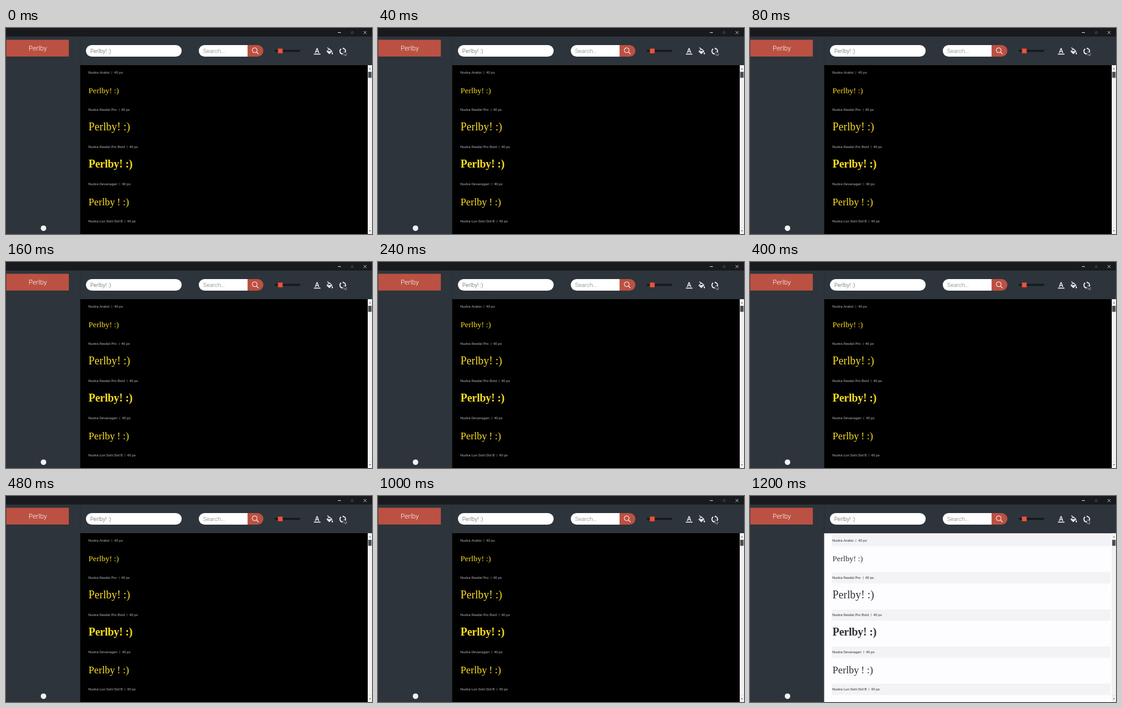
Write an HTML page with a canvas that moves like this. It is 600x338 px and loops after 1.92 s.

```html
<!DOCTYPE html>
<html lang="en">
<head>
<meta charset="utf-8">
<title>Font viewer</title>
<style>
  html, body { margin: 0; width: 100%; height: 100%; overflow: hidden; background: #2c333a; }
  canvas { display: block; width: 100%; height: 100%; }
</style>
</head>
<body>
<canvas id="stage"></canvas>
<script>
const W = 600, H = 338, LOOP = 1920;
const canvas = document.getElementById('stage');
const ctx = canvas.getContext('2d');
const dpr = window.devicePixelRatio || 1;
canvas.width = W * dpr;
canvas.height = H * dpr;

const SANS = 'Roboto, sans-serif';
const SERIF = '"Liberation Serif", serif';
const PANEL = '#2d343b', RED = '#bb5142', ICON = '#e3e5e7';
const SAMPLE = 'Perlby! :)';

const DARK = { back: '#000', label: '#b0b0b0', text: '#fbdd22', bar: null, edge: '#1d2226' };
const LIGHT = { back: '#fdfcfe', label: '#353537', text: '#303236', bar: '#f3f2f4', edge: '#8d9195' };

const fonts = [
  { name: 'Nudva Arabic', size: 13.1, base: 107 },
  { name: 'Nudva Resdal Pro', size: 17.9, base: 167.5 },
  { name: 'Nudva Resdal Pro Bold', size: 18.2, base: 228.5, weight: 'bold', spacing: -0.22 },
  { name: 'Nudva Devanagari', size: 16.6, base: 290.5, sample: 'Perlby\u2009! :)' },
  { name: 'Nudva Lun Soiti Std B' }
];

function rect(x, y, w, h, color) {
  ctx.fillStyle = color;
  ctx.fillRect(x, y, w, h);
}

function round(x, y, w, h, r, color) {
  ctx.fillStyle = color;
  ctx.beginPath();
  ctx.roundRect(x, y, w, h, r);
  ctx.fill();
}

function text(str, x, y, font, color, align = 'left', spacing = 0) {
  ctx.font = font;
  ctx.fillStyle = color;
  ctx.textAlign = align;
  ctx.letterSpacing = spacing + 'px';
  ctx.fillText(str, x, y);
}

function trace(points) {
  ctx.beginPath();
  points.forEach(([x, y], i) => i ? ctx.lineTo(x, y) : ctx.moveTo(x, y));
}

function fillPoly(points, color) {
  trace(points);
  ctx.closePath();
  ctx.fillStyle = color;
  ctx.fill();
}

function line(points, color, width) {
  trace(points);
  ctx.strokeStyle = color;
  ctx.lineWidth = width;
  ctx.stroke();
}

function arc(x, y, r, from, to, color, width) {
  ctx.beginPath();
  ctx.arc(x, y, r, from, to);
  ctx.strokeStyle = color;
  ctx.lineWidth = width;
  ctx.stroke();
}

function disc(x, y, r, color) {
  ctx.beginPath();
  ctx.arc(x, y, r, 0, Math.PI * 2);
  ctx.fillStyle = color;
  ctx.fill();
}

function windowBar() {
  rect(0, 0, W, 14, '#181a1d');
  line([[544, 7.5], [549, 7.5]], '#d4d5d6', 1);
  line([[567.5, 5.3], [569.3, 7.5], [567.5, 9.7], [565.7, 7.5], [567.5, 5.3]], '#6f7275', 0.7);
  line([[586.3, 5.2], [590.8, 9.7]], '#dcdcdd', 0.9);
  line([[590.8, 5.2], [586.3, 9.7]], '#dcdcdd', 0.9);
}

function sidebar() {
  rect(0, 14, 122, H - 14, PANEL);
  rect(121, 14, 1, 47, '#282e34');
  rect(0.5, 19.3, 102.5, 27.5, RED);
  text('Perlby', 52, 37, '300 11px ' + SANS, '#fff', 'center');
  disc(61.5, 328.5, 4.5, '#f2f3f3');
}

function bucketIcon() {
  fillPoly([[530, 33.3], [535.2, 38], [530, 43], [525.3, 38.6]], ICON);
  fillPoly([[529.8, 34.9], [533, 37.8], [527.2, 38]], PANEL);
  line([[526.8, 32], [530.4, 35.6]], ICON, 1.2);
  ctx.beginPath();
  ctx.moveTo(534.9, 39.2);
  ctx.quadraticCurveTo(537.4, 43.3, 534.9, 43.3);
  ctx.quadraticCurveTo(532.6, 43.3, 534.9, 39.2);
  ctx.fillStyle = ICON;
  ctx.fill();
}

function refreshIcon() {
  arc(552, 38, 4.6, -1.2, 0.6, '#fff', 1.7);
  arc(552, 38, 4.6, 1.9, 4.1, '#fff', 1.7);
  fillPoly([[552.2, 32], [554.6, 33.4], [552.2, 35.2]], '#fff');
  fillPoly([[551.8, 44], [549.4, 42.6], [551.8, 40.8]], '#fff');
}

function header() {
  rect(122, 14, W - 122, 47, PANEL);
  round(131, 28, 157, 19, 9.5, '#fff');
  text(SAMPLE, 138, 40.7, '300 9.2px ' + SANS, '#55585c');

  round(316, 28, 80, 19, [9.5, 0, 0, 9.5], '#fff');
  round(396, 28, 26, 19, [0, 9.5, 9.5, 0], RED);
  text('Search...', 323, 40.7, '300 9.6px ' + SANS, '#74777a');
  arc(407.7, 36.5, 4, 0, Math.PI * 2, '#fff', 1);
  line([[410.6, 39.4], [414, 42.8]], '#fff', 1.1);

  round(440.5, 35.7, 42, 3.6, 1.5, '#171a1e');
  round(445.7, 33.7, 7.9, 7.7, 1.2, '#f04f3a');

  text('A', 510, 40.6, 'bold 11px ' + SANS, ICON, 'center');
  rect(504.7, 42, 10.8, 1.6, ICON);
  bucketIcon();
  refreshIcon();
}

function fontList(theme) {
  rect(122, 61, 471, H - 61, theme.back);
  rect(121, 61, 1, H - 61, theme.edge);
  if (theme.bar) rect(122, 61, 471, 1, '#d2d3d6');
  fonts.forEach((f, i) => {
    const mid = 73 + i * 61;
    if (theme.bar) rect(134, mid - 9, 457, 18.5, theme.bar);
    text(f.name + '  |  40 px', 135, mid + 2.1, '5.9px ' + SANS, theme.label);
    if (f.size) {
      const font = `${f.weight || 'normal'} ${f.size}px ${SERIF}`;
      text(f.sample || SAMPLE, 135.3, f.base, font, theme.text, 'left', f.spacing);
    }
  });
}

function scrollbar() {
  rect(593, 61, 7, H - 61, '#f1f1f2');
  rect(593, 71.5, 7, 0.5, '#d5d6d8');
  rect(593, 327, 7, 0.5, '#d5d6d8');
  rect(593.7, 72, 5.6, 9.7, '#494d53');
  fillPoly([[595.2, 67.7], [598.2, 67.7], [596.7, 65.9]], '#46494d');
  fillPoly([[595.2, 332], [598.2, 332], [596.7, 333.8]], '#46494d');
}

function pointer(x, y) {
  const shape = [[0, 0], [0, 7], [1.6, 5.6], [2.7, 8], [3.8, 7.5], [2.8, 5.2], [4.9, 5], [0, 0]];
  const points = shape.map(([dx, dy]) => [x + dx, y + dy]);
  fillPoly(points, '#1b1f23');
  line(points, '#c9ccce', 0.6);
}

function draw(t) {
  ctx.setTransform(dpr, 0, 0, dpr, 0, 0);
  windowBar();
  sidebar();
  header();
  fontList(t < 1200 ? DARK : LIGHT);
  scrollbar();
  if (t < 1000) pointer(554, 38);
  else pointer(553, 38.5);
}

const start = performance.now();
function tick() {
  draw((performance.now() - start) % LOOP);
  requestAnimationFrame(tick);
}
tick();
</script>
</body>
</html>
```
